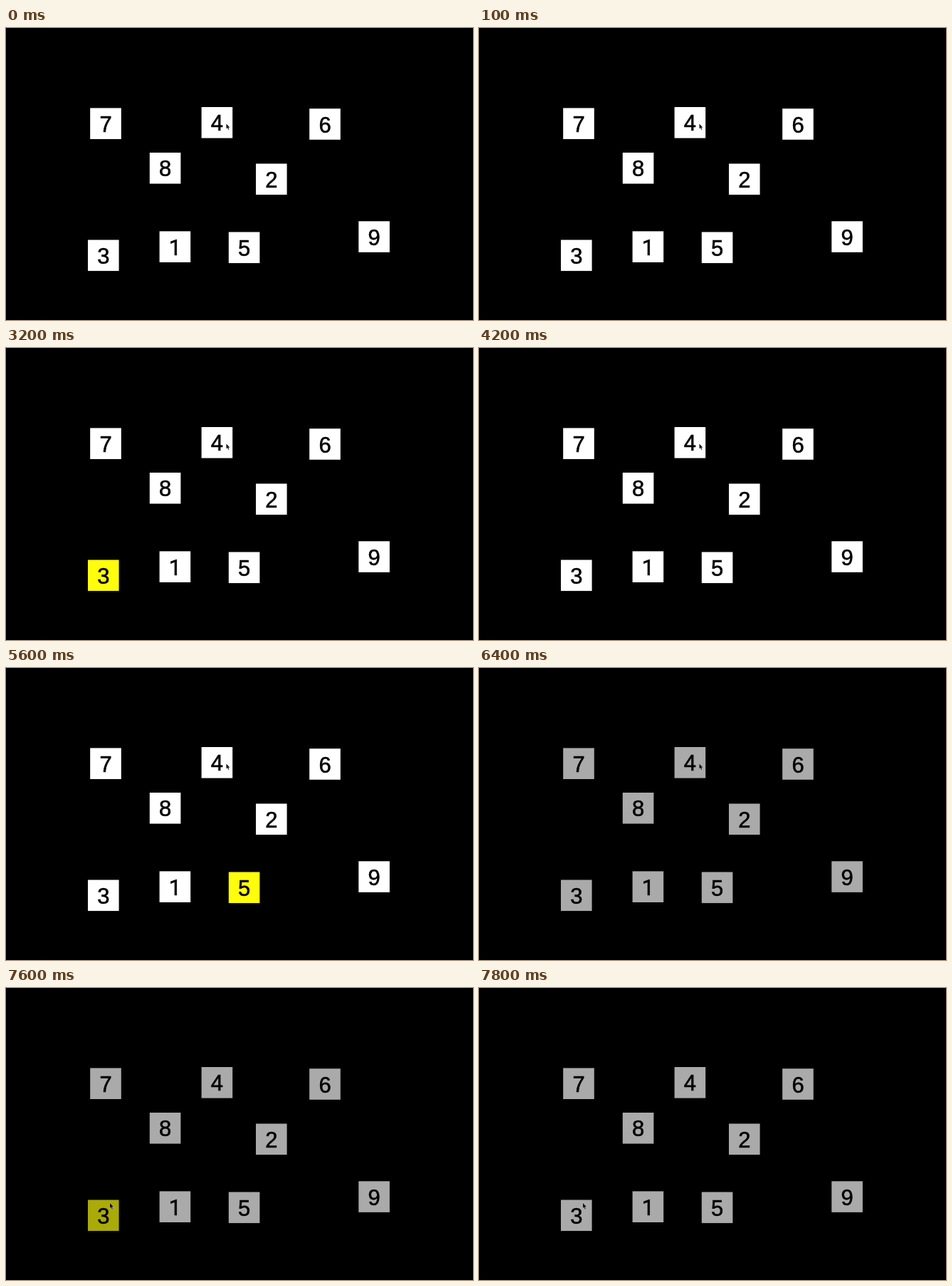
Animation, 656 px wide and 410 px high, one loop 8 s. Source, as an HTML page with a canvas:

```html
<!DOCTYPE html>
<html lang="en">
<head>
<meta charset="utf-8">
<title>Number cards</title>
<style>
html, body { margin: 0; width: 100%; height: 100%; overflow: hidden; background: #000; }
canvas { display: block; }
</style>
</head>
<body>
<canvas id="stage" width="656" height="410"></canvas>
<script>
const ctx = document.getElementById('stage').getContext('2d');
const LOOP = 8000, SIZE = 43.6;
const DIM_AT = 6400, MOVE_AT = 6800, MOVE_FOR = 600;
const FROM = { x: 309.5, y: 134.5 }, TO = { x: 146, y: 302 };

// Top left corners of cards 1 to 9
const corners = [
  [215.6, 285.4], [351, 190.5], [115, 297.5],
  [274.6, 111], [312.8, 286.5], [426.2, 113.2],
  [118.2, 112.4], [201.8, 175], [495.3, 271.3]
];

function litDigit(t) {
  const during = (from, to) => t >= from && t < to;
  if (during(2800, 4200) || during(7600, 7800)) return 3;
  return during(4900, DIM_AT) ? 5 : 0;
}

// Gentle start, then a long settle; a higher power settles sooner
function glide(u, power) {
  return 1 - Math.pow(1 - u * u, power);
}

function pointerAt(t) {
  const tick = Math.floor(t / 100) * 100;
  const u = Math.min(1, Math.max(0, (tick - MOVE_AT) / MOVE_FOR));
  return [
    FROM.x + (TO.x - FROM.x) * glide(u, 9.2),
    FROM.y + (TO.y - FROM.y) * glide(u, 6.4)
  ];
}

function drawCard(digit, x, y, lit, dim) {
  if (lit) ctx.fillStyle = dim ? '#aaaa08' : '#fffd0c';
  else ctx.fillStyle = dim ? '#aaa' : '#fff';
  ctx.fillRect(x, y, SIZE, SIZE);
  ctx.fillStyle = ctx.strokeStyle = '#000';
  ctx.lineWidth = 0.6;
  // Roboto has the plain 1 without a foot
  ctx.font = `31px ${digit === 1 ? 'Roboto' : '"Liberation Sans"'}, sans-serif`;
  ctx.fillText(digit, x + SIZE / 2, y + 33.4);
  ctx.strokeText(digit, x + SIZE / 2, y + 33.4);
}

function drawPointer(t, dim) {
  ctx.save();
  ctx.translate(...pointerAt(t));
  const arrow = new Path2D('M0 0V7L1.6 5.6L2.8 8.4L3.8 8L2.7 5.3H4.9Z');
  ctx.lineWidth = 1.2;
  ctx.strokeStyle = dim ? '#b4b4b4' : '#fff';
  ctx.stroke(arrow);
  ctx.fillStyle = '#111';
  ctx.fill(arrow);
  ctx.restore();
}

function draw(t) {
  const dim = t >= DIM_AT, lit = litDigit(t);
  ctx.fillStyle = '#000';
  ctx.fillRect(0, 0, 656, 410);
  ctx.textAlign = 'center';
  corners.forEach(([x, y], i) => drawCard(i + 1, x, y, i + 1 === lit, dim));
  drawPointer(t, dim);
}

const start = performance.now();
function frame() {
  draw((performance.now() - start) % LOOP);
  requestAnimationFrame(frame);
}
frame();
</script>
</body>
</html>
```
